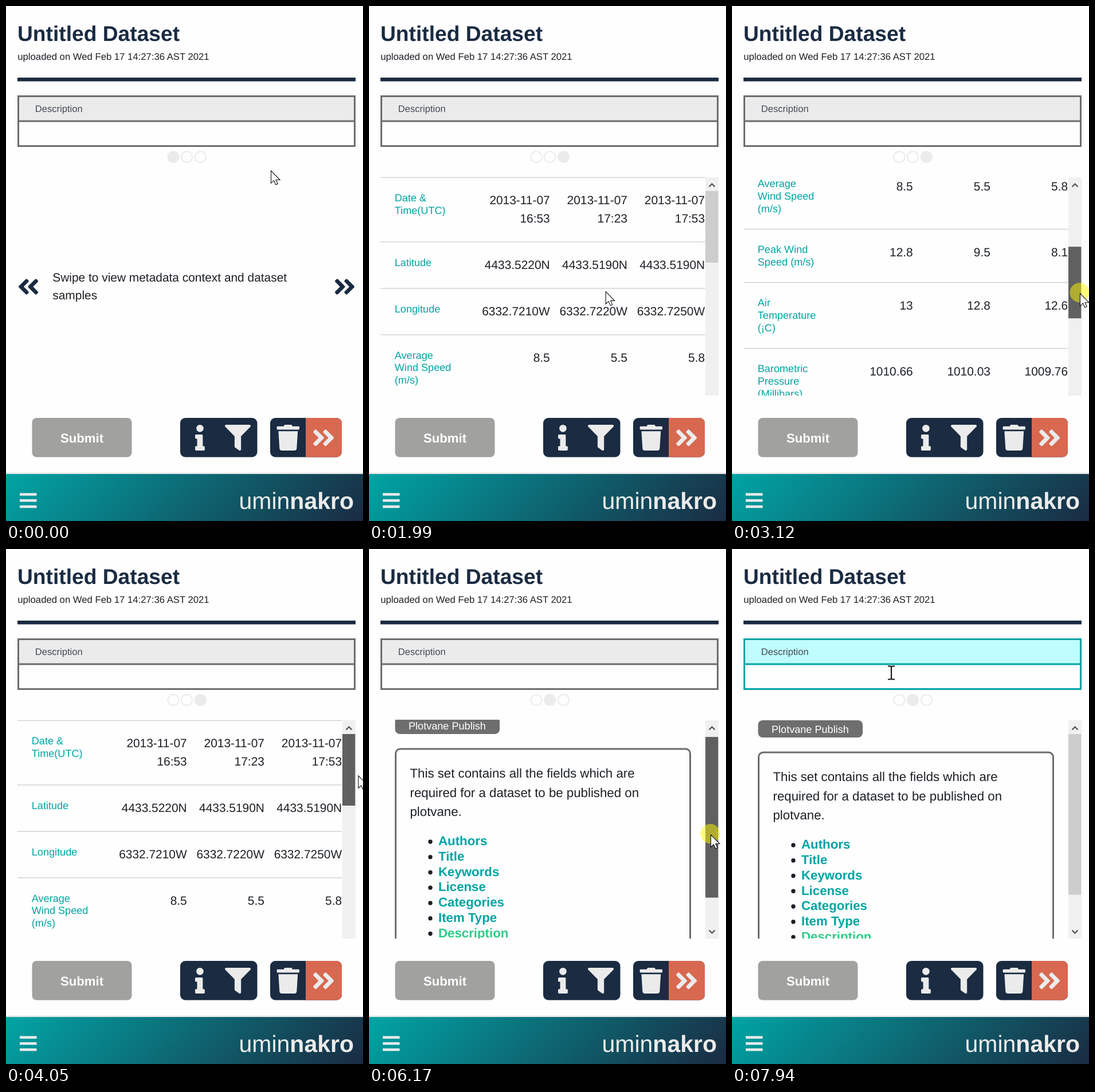
Write an HTML page that moves like this. It is 623 by 899 pixels and loops after 8000 ms.

```html
<!DOCTYPE html>
<html lang="en">
<head>
<meta charset="utf-8">
<title>Dataset swipe</title>
<style>
html, body { margin: 0; width: 100%; height: 100%; overflow: hidden; background: #fefefe; }
svg { display: block; width: 623px; height: 899px; font-family: "Liberation Sans", Arial, sans-serif; text-rendering: geometricPrecision; }
.ink { fill: #1a2b42; }
.pale { fill: #ebebeb; }
.body { fill: #1c2026; font-size: 20.9px; }
.num { text-anchor: end; }
.label { fill: #00a3a3; font-size: 18.1px; }
.card { fill: #1c2026; font-size: 22.25px; }
.item { fill: #00a3a3; font-size: 22.25px; font-weight: bold; }
.frame { fill: none; stroke: #6c6c6c; stroke-width: 3; }
.rule { stroke: #cbcbcb; stroke-width: 1.2; }
.dot { fill: none; stroke: #ebebeb; stroke-width: 2; }
.dot.on { fill: #ebebeb; }
.chev { fill: none; stroke: #505050; stroke-width: 2.2; }
#head { fill: #ebebeb; }
.hover #head { fill: #bffefe; }
.hover .frame { stroke: #00a3a3; }
</style>
</head>
<body>
<svg viewBox="0 0 623 899">
  <defs>
    <linearGradient id="sea" gradientUnits="userSpaceOnUse" x1="135" y1="681" x2="488" y2="1034">
      <stop offset="0" stop-color="#00a5a5"/><stop offset="1" stop-color="#1a2b42"/>
    </linearGradient>
    <clipPath id="view"><rect x="20" y="298" width="590" height="382"/></clipPath>
    <path id="angles" d="M224.3 273l-136 136c-9.4 9.4-24.6 9.4-33.9 0l-22.6-22.6c-9.4-9.4-9.4-24.6 0-33.9l96.4-96.4-96.4-96.4c-9.4-9.4-9.4-24.6 0-33.9L54.3 103c9.4-9.4 24.6-9.4 33.9 0l136 136c9.5 9.4 9.5 24.6.1 34zm192-34l-136-136c-9.4-9.4-24.6-9.4-33.9 0l-22.6 22.6c-9.4 9.4-9.4 24.6 0 33.9l96.4 96.4-96.4 96.4c-9.4 9.4-9.4 24.6 0 33.9l22.6 22.6c9.4 9.4 24.6 9.4 33.9 0l136-136c9.4-9.2 9.4-24.4 0-33.8z"/>
  </defs>
  <rect width="623" height="899" fill="#fefefe"/>

  <text class="ink" x="20" y="60.5" font-size="37.2" font-weight="bold">Untitled Dataset</text>
  <text x="20.3" y="94" font-size="16.7" fill="#1c2026">uploaded on Wed Feb 17 14:27:36 AST 2021</text>
  <rect class="ink" x="20" y="125" width="590" height="6.5"/>

  <g id="field">
    <rect id="head" x="21" y="157" width="588" height="44"/>
    <path class="frame" d="M21.5 157.5H608.5V244.5H21.5ZM21.5 201H608.5"/>
    <text x="50.7" y="184.7" font-size="16.6" fill="#434b54">Description</text>
  </g>

  <g id="dots">
    <circle class="dot" cx="292" cy="263.5" r="9.6"/>
    <circle class="dot" cx="315.5" cy="263.5" r="9.6"/>
    <circle class="dot" cx="339.5" cy="263.5" r="9.6"/>
  </g>

  <g clip-path="url(#view)">
    <g id="strip">
      <g id="intro">
        <use href="#angles" class="ink" transform="translate(58.2 468.2) scale(-.0853 .0853)"/>
        <use href="#angles" class="ink" transform="translate(571.9 468.2) scale(.0853)"/>
        <text class="body" x="81.3" y="480.5">Swipe to view metadata context and dataset</text>
        <text class="body" x="81.3" y="512">samples</text>
      </g>
      <g id="samples" transform="translate(-590)">
        <g id="rows"></g>
        <rect x="587" y="299" width="23" height="381" fill="#f0f0f0"/>
        <rect id="thumbA" x="587" y="323" width="22.4" height="125"/>
        <path class="chev" d="M593.5 315.5l5-5 5 5"/>
      </g>
      <g id="context" transform="translate(-1180)">
        <g id="sheet">
          <rect x="45.5" y="299" width="182.5" height="30" rx="8" fill="#6e6e6e"/>
          <text x="69" y="320.7" font-size="18.1" fill="#fff">Plotvane Publish</text>
          <rect class="frame" x="46.5" y="355" width="514" height="376" rx="8"/>
          <text class="card" x="71.5" y="405.3">This set contains all the fields which are</text>
          <text class="card" x="71.5" y="438.8">required for a dataset to be published on</text>
          <text class="card" x="71.5" y="472.2">plotvane.</text>
        </g>
        <rect x="587" y="299" width="23" height="381" fill="#f0f0f0"/>
        <rect id="thumbB" x="587" y="323" width="22.4" height="280.5"/>
        <path class="chev" d="M593.5 315.5l5-5 5 5M593.5 665.5l5 5 5-5"/>
      </g>
    </g>
  </g>

  <rect x="45.5" y="719" width="174" height="68.5" rx="8" fill="#a1a19f"/>
  <text x="132.5" y="761.7" font-size="22.2" font-weight="bold" fill="#fff" text-anchor="middle">Submit</text>
  <rect class="ink" x="304" y="719" width="134.5" height="68.5" rx="9"/>
  <path class="pale" transform="translate(330 731) scale(.088)" d="M20 424.2h20V279.8H20c-11 0-20-9-20-20V212c0-11 9-20 20-20h112c11 0 20 9 20 20v212.2h20c11 0 20 9 20 20V492c0 11-9 20-20 20H20c-11 0-20-9-20-20v-47.8c0-11 9-20 20-20zM96 0a72 72 0 1 0 0 144a72 72 0 1 0 0-144z"/>
  <path class="pale" transform="translate(382 731) scale(.088)" d="M488 0H24C2.7 0-8 25.9 7 41l185 185v206c0 7.8 3.8 15.2 10.2 19.7l80 56c15.8 11 37.8-.2 37.8-19.7V226L505 41C520 25.900 509.300 0 488 0z"/>
  <rect class="ink" x="461" y="719" width="125" height="68.5" rx="9"/>
  <path fill="#d86850" d="M523 719h54a9 9 0 0 1 9 9v50.500a9 9 0 0 1-9 9h-54z"/>
  <path class="pale" transform="translate(472.600 731) scale(.088)" d="M432 32H312l-9.400-18.700A24 24 0 0 0 281 0H166.800a23.700 23.700 0 0 0-21.400 13.300L136 32H16A16 16 0 0 0 0 48v32a16 16 0 0 0 16 16h416a16 16 0 0 0 16-16V48a16 16 0 0 0-16-16zM53.200 467a48 48 0 0 0 47.900 45h245.800a48 48 0 0 0 47.900-45L416 128H32z"/>
  <use href="#angles" class="pale" transform="translate(534 730.700) scale(.09)"/>

  <rect y="814.500" width="623" height="3" fill="#e4e6e6"/>
  <rect y="817" width="623" height="82" fill="url(#sea)"/>
  <path d="M24 852.500h29.500M24 863.200h29.500M24 874h29.500" stroke="#ebebeb" stroke-width="4.400"/>
  <text class="pale" x="607" y="878" font-size="41" text-anchor="end">umin<tspan font-weight="bold">nakro</tspan></text>

  <circle id="press" r="17" fill="#fffa00" fill-opacity=".5"/>
  <path id="arrow" d="M.5.700V22.300L5.400 17.700L8.800 25L12.200 23.500L9 16.500H16z" fill="#fff" stroke="#111" stroke-width="1.100"/>
  <path id="beam" d="M-6-11.500h3.500q2.500 0 2.500 2V9.500q0 2-2.500 2H-6M6-11.500H2.500q-2.500 0-2.500 2M0 9.500q0 2 2.500 2H6" fill="none" stroke="#111" stroke-width="2"/>
</svg>
<script>
const LOOP = 8000, WIDTH = 590;
const $ = id => document.getElementById(id);

function add(parent, tag, attrs, text = "") {
  const el = document.createElementNS("http://www.w3.org/2000/svg", tag);
  for (const k in attrs) el.setAttribute(k, attrs[k]);
  el.textContent = text;
  parent.append(el);
}

// label lines | values per column
const table = [
  ["Date &/Time(UTC)", "2013-11-07/16:53", "2013-11-07/17:23", "2013-11-07/17:53"],
  ["Latitude", "4433.5220N", "4433.5190N", "4433.5190N"],
  ["Longitude", "6332.7210W", "6332.7220W", "6332.7250W"],
  ["Average/Wind Speed/(m/s)", "8.5", "5.5", "5.8"],
  ["Peak Wind/Speed (m/s)", "12.8", "9.5", "8.1"],
  ["Air/Temperature/(¡C)", "13", "12.8", "12.6"],
  ["Barometric/Pressure/(Millibars)", "1010.66", "1010.03", "1009.76"],
  ["Surface/Temperature/(¡C)", "11.4", "11.4", "11.3"],
  ["Wave Height/(m)", "1.2", "1.1", "1.1"],
  ["Wave Period/(s)", "7.1", "6.9", "7.4"]
];
const lines = s => s.replace("(m/s)", "(m|s)").split("/").map(l => l.replace("|", "/"));
let top_ = 299;
for (const [label, ...values] of table) {
  const names = lines(label);
  add($("rows"), "path", { class: "rule", d: `M20 ${top_ + .3}H586.5` });
  names.forEach((s, i) => add($("rows"), "text", { class: "label", x: 44.800, y: top_ + 42 + i * 21.700 }, s));
  values.forEach((v, c) => v.split("/").forEach((s, i) =>
    add($("rows"), "text", { class: "body num", x: 315.700 + c * 135.200, y: top_ + 47.300 + i * 31.400 }, s)));
  top_ += values[0].includes("/") ? 112.500 : [81, 93, 115][names.length - 1];
}

["Authors", "Title", "Keywords", "License", "Categories", "Item Type", "Description"].forEach((s, i) => {
  const y = 523.300 + i * 26.750;
  add($("sheet"), "circle", { cx: 107, cy: y - 6.300, r: 3.700, fill: "#1c2026" });
  add($("sheet"), "text", { class: "item", x: 121, y, style: i == 6 ? "fill:#2fcb88" : "" }, s);
});

// Moves are [start, end, ...target]; values hold in between.
const soft = u => (u + u * u * (3 - 2 * u)) / 2;
const linear = u => u;
const out = u => 1 - (1 - u) ** 3;
function track(t, from, moves, ease = soft) {
  let at = from;
  for (const [a, b, ...to] of moves) {
    if (t <= a) break;
    const k = ease(Math.min(1, (t - a) / (b - a)));
    at = at.map((v, i) => v + (to[i] - v) * k);
  }
  return at;
}

const browse = [
  [30, 290, 405, 172], [290, 420, 380, 184], [620, 740, 153, 462], [900, 1020, 492, 487],
  [1320, 1470, 270, 490], [1500, 1680, 400, 496], [1700, 1990, 412, 498],
  [1990, 2110, 556, 473], [2140, 2350, 600, 404]
];
const dragRows = [[2820, 3120, 607, 501], [3120, 3240, 607, 529], [3640, 3820, 615, 395]];
const dragSheet = [
  [4050, 4370, 250, 470], [4400, 4600, 420, 478], [4600, 4850, 430, 480], [4880, 5480, 603, 492],
  [5710, 5970, 598, 493], [6140, 6170, 596, 498], [6170, 6600, 596, 545],
  [7230, 7480, 607, 493], [7520, 7900, 278, 216]
];

const within = (t, a, b) => t >= a && t < b;
const show = (id, on) => $(id).setAttribute("visibility", on ? "visible" : "hidden");
const move = (id, x, y) => $(id).setAttribute("transform", `translate(${x} ${y})`);

function thumb(id, offset, height, held, live, x, y) {
  const el = $(id), over = live && x >= 587 && x < 610 && y >= 323 + offset && y < 323 + offset + height;
  el.setAttribute("y", 323 + offset);
  el.setAttribute("fill", held ? "#606060" : over ? "#a6a6a6" : "#cdcdcd");
}

function draw(t) {
  let [x, y] = track(t, [462, 287], browse);
  if (t > 2820) [x, y] = track(t, [600, 404], dragRows, linear);
  if (t > 4050) [x, y] = track(t, [615, 395], dragSheet);

  // Each swipe follows the pointer, then eases to the next slide.
  let [slide] = track(t, [0], [[1500, 1680, 130], [4400, 4600, WIDTH + 170]]);
  if (within(t, 1680, 4400)) [slide] = track(t, [130], [[1680, 1970, WIDTH]], out);
  else if (t >= 4400 && t < 4600) slide = WIDTH + x - 250;
  else if (t >= 4600) [slide] = track(t, [WIDTH + 170], [[4600, 4910, 2 * WIDTH]], out);
  move("strip", slide, 0);

  const active = t < 1680 ? 0 : t < 4600 ? 2 : 1;
  [...$("dots").children].forEach((d, i) => d.classList.toggle("on", i == active));

  const [a] = track(t, [0], [[2820, 3120, 97], [3120, 3240, 125], [3640, 3820, 0]], linear);
  const [b] = track(t, [0], [[6140, 6170, 5], [6170, 6600, 52], [7230, 7480, 0]]);
  move("rows", 0, -a * 3.077);
  move("sheet", 0, -b * 1.200);
  thumb("thumbA", a, 125, within(t, 2645, 4065), active == 2, x, y);
  thumb("thumbB", b, 280.500, within(t, 5965, 7510), active == 1, x, y);

  const hover = y > 156 && y < 246;
  $("field").setAttribute("class", hover ? "hover" : "");
  show("arrow", !hover);
  show("beam", hover);
  move("arrow", x, y);
  move("beam", x, y);
  move("press", x - .5, y - 1);
  show("press", within(t, 1490, 1680) || within(t, 2645, 4045) || within(t, 4390, 4600) || within(t, 5965, 7495));
}

const start = performance.now();
function tick() {
  draw((performance.now() - start) % LOOP);
  requestAnimationFrame(tick);
}
tick();
</script>
</body>
</html>
```
